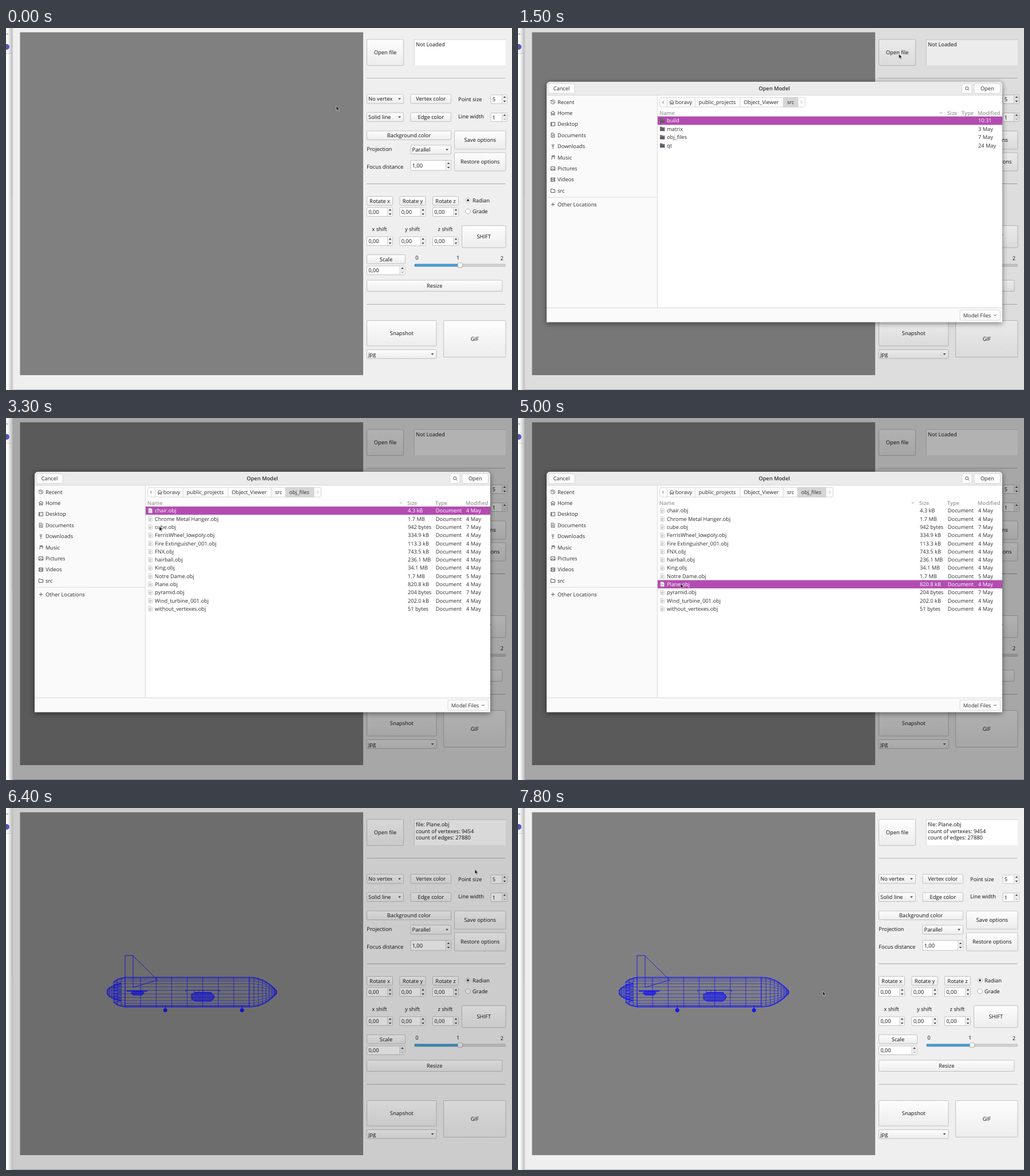
An HTML page that plays this animation: 884x633 px, repeating every 8000 ms.

```html
<!DOCTYPE html>
<html lang="en">
<head>
<meta charset="utf-8">
<title>Object viewer</title>
<style>
  html, body { margin: 0; width: 100%; height: 100%; overflow: hidden; background: #fff; }
  svg { display: block; width: 100%; height: 100%; }
  text { font: 9.35px "Open Sans", "Noto Sans", sans-serif; fill: #111; text-rendering: geometricPrecision; white-space: pre; }
  .dialog text { font-size: 9.25px; fill: #2c2c2c; }
  .dialog text.bold { font-weight: 600; }
  .dialog text.head { font-weight: 600; fill: #979d98; }
  .dialog text.head.hover { fill: #555a56; }
  .dialog .sel text { fill: #fff; }
  .row .bar { fill: none; }
  .sel .bar { fill: #b34cb1; }
  .icon { fill: none; stroke: #4a4a4a; stroke-width: .9; }
  .wire { fill: none; stroke: #1616f2; stroke-width: .75; }
</style>
</head>
<body>
<svg id="stage" viewBox="0 0 884 633" xmlns="http://www.w3.org/2000/svg">
  <defs>
    <linearGradient id="face" x2="0" y2="1"><stop stop-color="#fdfdfd"/><stop offset="1" stop-color="#ededed"/></linearGradient>
    <linearGradient id="edge"><stop stop-color="#777" stop-opacity="0"/><stop offset="1" stop-color="#777" stop-opacity=".5"/></linearGradient>
  </defs>
</svg>
<script>
const LOOP = 8000, STEP = 100;
const stage = document.getElementById("stage");
let parent = stage;

function el(tag, attrs, content) {
  const node = document.createElementNS("http://www.w3.org/2000/svg", tag);
  for (const k in attrs) node.setAttribute(k, attrs[k]);
  if (content !== undefined) node.textContent = content;
  parent.appendChild(node);
  return node;
}
function group(attrs, build) {
  const outer = parent;
  const node = parent = el("g", attrs);
  build(node);
  parent = outer;
  return node;
}
const box = (x, y, x2, y2, fill, stroke = "none", rx = 0) =>
  el("rect", { x, y, width: x2 - x, height: y2 - y, fill, stroke, rx, "stroke-width": .8 });
const path = (d, attrs) => el("path", { d, ...attrs });
const line = (x, y, x2, y2, stroke, w = 1) => path(`M${x} ${y}L${x2} ${y2}`, { stroke, "stroke-width": w });
// y is the middle of the line of text
const label = (s, x, y, cls = "", anchor = "start") =>
  el("text", { x, y: y + 3.3, class: cls, "text-anchor": anchor }, s);

/* ---------- main window ---------- */
const GREY = "#b4b4b4";

function button(s, x, y, x2, y2) {
  const face = box(x, y, x2, y2, "url(#face)", GREY, 1.5);
  label(s, (x + x2) / 2, (y + y2) / 2, "", "middle");
  return face;
}
function arrow(x, y, dir, fill = "#444") {
  path(`M${x - 2.5} ${y - 1.3 * dir}h5l-2.5 ${2.8 * dir}z`, { fill });
}
function combo(s, x, y, x2, y2) {
  box(x, y, x2, y2, "url(#face)", GREY, 1.5);
  label(s, x + 2.5, (y + y2) / 2);
  arrow(x2 - 7, (y + y2) / 2, 1);
}
function spin(s, x, y, x2, y2, lowered = "#444") {
  const mid = (y + y2) / 2, bx = x2 - 9;
  box(x, y, x2, y2, "#fff", GREY, 1.5);
  box(bx, y + .4, x2 - .4, y2 - .4, "#f4f4f4");
  line(bx, y, bx, y2, "#c4c4c4", .8);
  line(bx, mid, x2, mid, "#d4d4d4", .6);
  arrow(x2 - 4.5, mid - 3.8, -1);
  arrow(x2 - 4.5, mid + 3.8, 1, lowered);
  label(s, x + 2.7, mid + .2);
}
function rule(y) {
  line(630, y, 872.5, y, "#9c9c9c", 1);
  line(630, y + 1, 872.5, y + 1, "#fafafa", .8);
}
function radio(s, y, on) {
  el("circle", { cx: 807, cy: y, r: 4.2, fill: "#fff", stroke: "#a4a4a4", "stroke-width": .8 });
  if (on) el("circle", { cx: 807, cy: y, r: 2, fill: "#333" });
  label(s, 815, y);
}

// strip of the window behind
box(0, 0, 12, 633, "#fff");
box(0, 0, 12, 44, "#fafafa");
line(0, 44.5, 11, 44.5, "#d8d8d8");
line(0, 10.5, 4, 10.5, "#777", .9);
el("circle", { cx: 1, cy: 33, r: 5, fill: "#5059b5" });
box(3, 0, 11.5, 633, "url(#edge)");
line(11, 45, 11, 296, "#b0b0b0", .8);

let openFace, notes, info;
box(11.5, 0, 884, 633, "#efefef");
line(11.5, 632.5, 884, 632.5, "#b5b5b5");
line(11.8, 0, 11.8, 633, "#c6c6c6", .7);
box(24.5, 7.5, 624, 607, "#808080");

openFace = button("Open file", 630.5, 20, 694.5, 65.5);
box(713, 20, 873, 65, "#fff");
path("M713.3 65V20.3H873", { fill: "none", stroke: "#c0c0c0", "stroke-width": .7 });
notes = group({}, () => label("Not Loaded", 716, 29));
info = group({}, () => ["file: Plane.obj", "count of vertexes: 9454", "count of edges: 27880"]
  .forEach((s, i) => label(s, 716, 29 + 11.5 * i)));

[88, 272.5, 483.3].forEach(rule);

combo("No vertex", 630.5, 116, 694.5, 132);
button("Vertex color", 707, 116, 777.5, 132);
label("Point size", 790, 124.5);
spin("5", 847, 117, 875.5, 132);
combo("Solid line", 630.5, 148, 694.5, 163.5);
button("Edge color", 707, 148, 777.5, 163.5);
label("Line width", 790, 154.7);
spin("1", 847, 148.5, 875.5, 163.5, "#bbb");

button("Background color", 630.5, 180, 777.5, 195.5);
button("Save options", 783.5, 180, 873, 212);
button("Restore options", 783.5, 218, 873, 250);
label("Projection", 630.3, 212);
combo("Parallel", 707, 205, 777.5, 220.7);
label("Focus distance", 630.3, 242.7);
spin("1,00", 707, 231.5, 777.5, 249);

["x", "y", "z"].forEach((axis, i) => {
  const x = 630.5 + 57.5 * i;
  button("Rotate " + axis, x, 294.5, x + 45, 310);
  spin("0,00", x, 314, x + 45, 329.3);
  label(axis + " shift", x + 22, 352, "", "middle");
  spin("0,00", x, 365, x + 45, 380.3);
});
radio("Radian", 301.3, true);
radio("Grade", 320.5, false);
button("SHIFT", 796.5, 345.5, 873, 384);

button("Scale", 630.5, 396.5, 697.5, 412);
spin("0,00", 630.5, 416, 697, 431.3, "#bbb");
label("0", 718, 402, "", "middle");
label("1", 789.7, 402, "", "middle");
label("2", 866.3, 403, "", "middle");
box(714, 413, 872.5, 416.8, "#d4d4d4", "#b0b0b0", 1);
box(714, 413, 791, 416.8, "#45a0d6", "#3585b4", 1);
box(789.3, 410.8, 797.5, 418.8, "url(#face)", "#a0a0a0", 1.5);

button("Resize", 630.5, 441, 867, 460.5);
button("Snapshot", 630.5, 511.5, 752, 556);
combo("jpg", 630.5, 562.5, 752, 578);
button("GIF", 764.5, 511.5, 873, 575.5);

/* ---------- wireframe model ---------- */
const plane = group({ class: "wire" }, () => {
  const cy = 322, R = 26, sides = 13;
  const level = k => Math.cos(Math.PI * k / sides);
  const at = (x, y) => `${x.toFixed(1)} ${y.toFixed(1)}`;
  const lathe = (xs, radius, rings = true) => {
    for (let k = 0; k <= sides; k++)
      path("M" + xs.map(x => at(x, cy - radius(x) * level(k))).join("L"),
        k % sides ? { "stroke-width": .6 } : { "stroke-width": 1.2 });
    if (rings) xs.forEach(x => path(`M${at(x, cy - radius(x))}V${cy + radius(x)}`));
  };
  const span = (a, b, n, p = 1) => Array.from({ length: n + 1 }, (_, i) => a + (b - a) * (1 - (1 - i / n) ** p));

  lathe(span(208, 425, 8), () => R);
  lathe(span(425, 473, 9, 1.6), x => 2 + 24 * (1 - ((x - 425) / 48) ** 2.2));
  lathe(span(188, 208, 3), x => 17.5 + 8.5 * Math.sqrt((x - 188) / 20));
  lathe(span(176, 201, 6), x => 2 + 13.5 * Math.sqrt((x - 176) / 25), false);
  line(208, 346, 425, 346, "#1616f2", .8);

  // jagged seam at the tail
  let d = "M188 304";
  for (let i = 1; i <= 14; i++) d += `L${i % 2 ? 201 : 188} ${304 + i * 2.55}`;
  path(d);
  path("M181 315V328M185 311V333M189 309V335");

  // fin
  path("M208 297V258H221.5L265 301L222 313.5V258", { "stroke-width": .9 });

  // tailplane and its engine
  path("M211 319.7H248M211 320.7H247", { "stroke-width": 1 });
  path("M218 323.5L222 320.8H238L241.5 323L238 327.3H222Z", { fill: "#1616f2", "fill-opacity": .75 });

  // wing and its engine
  path("M313 318.6H374M314 318.6V322M329 318.6V323M337 318.6V323M345 318.6V322M373 318.6V322");
  path("M324 326L331 322.5H358L364 330L358 338H331L324 334Z", { fill: "#1616f2", "fill-opacity": .3, "stroke-width": 1.1 });
  for (let i = 0; i < 10; i++) path(`M${331 + i * 3} 322.5V338`);
  for (let i = 0; i < 6; i++) path(`M325 ${326 + i * 1.6}L331 ${323.5 + i * 2.7}H358L363.5 ${328 + i}`);

  // wheels
  [278.3, 412.3].forEach(x => {
    path(`M${x} 345V351`, { "stroke-width": 1.2 });
    el("circle", { cx: x, cy: 353.6, r: 3.2, fill: "#1616f2" });
  });
});

const dim = box(11.5, 0, 884, 633, "#000");

/* ---------- file dialog ---------- */
const ICONS = {
  Recent: "M-3.5 0a3.5 3.5 0 1 0 1-2.5M-3.6-3.5v2h2M0-2V0L2 1",
  Home: "M-4 0L0-3.5L4 0M-2.7-.8V3.5H-1V1H1V3.5H2.7V-.8",
  Desktop: "M-3.5-3H3.5V3H-3.5ZM-2.2-3V3",
  Documents: "M-2.8-3.6H1L2.8-1.8V3.6H-2.8ZM-1.4-.6H1.4M-1.4 1.2H1.4",
  Downloads: "M0-3.5V1M-1.8-.8L0 1L1.8-.8M-1.6 3.2H1.6M-1.8-3.5V-2M1.8-3.5V-2",
  Music: "M-1.6 2.4V-3H3V1.4M-3.2 2.6H-1.6M1.4 1.8H3M-1.6-1.6H3",
  Pictures: "M-3.6-3H3.6V3H-3.6ZM-3 2.4L-.8-.2L.8 1.6L1.8.6L3 2.4M1.4-1.4h.8",
  Videos: "M-3.4-3H3.4V3H-3.4ZM-1.9-3V3M1.9-3V3M-1.9 0H1.9",
  src: "M-3.6 3V-3H-.8L.2-1.8H3.6V3Z",
  "Other Locations": "M-3 0H3M0-3V3"
};
const icon = (d, x, y) => path(d, { class: "icon", transform: `translate(${x} ${y})` });
const chevron = (x, y, turn, stroke) =>
  path("M-2.2-1.1L0 1.1L2.2-1.1", { fill: "none", stroke, "stroke-width": 1, transform: `translate(${x} ${y}) rotate(${turn})` });
const LINE = "#cfcfcf";

function flat(s, x, y, x2, y2) {
  box(x, y, x2, y2, "#fcfcfc", LINE, 3);
  label(s, (x + x2) / 2, (y + y2) / 2, "", "middle");
}
function pathBar(crumbs, active, end) {
  box(247.5, 121.3, end + 12.5, 138.2, "#fbfbfb", LINE, 3);
  chevron(253.5, 129.8, 90, "#555");
  chevron(end + 6.3, 129.8, -90, "#aaa");
  box(active, 121.3, end, 138.2, "#d6d6d6", LINE);
  [260.5, 309.3, 388, 463.5].forEach(x => x < active && line(x, 121.3, x, 138.2, LINE, .8));
  icon(ICONS.Home, 268.7, 129.8);
  crumbs.forEach(([s, x]) => label(s, x, 129.8));
}
function heads(sizeX, typeX) {
  const name = label("Name", 247, 148.2, "head");
  chevron(sizeX - 11, 148.2, 0, "#979d98");
  label("Size", sizeX, 148.2, "head");
  label("Type", typeX, 148.2, "head");
  label("Modified", 803, 148.2, "head");
  return name;
}
function row(y, h, cells, drawIcon) {
  return group({ class: "row" }, () => {
    el("rect", { class: "bar", x: 244, y: y - h / 2, width: 602, height: h });
    drawIcon(y);
    cells.forEach(([s, x]) => label(s, x, y));
  });
}
function folderIcon(y) {
  path(`M248 ${y - 3.8}h3.4l1 1h4v6.6h-8.4z`, { fill: "#625a67" });
  line(248.3, y - 1.4, 256.2, y - 1.4, "#918997", .7);
}
function fileIcon(y) {
  path(`M249 ${y - 4}h4.4l2 2v6h-6.4z`, { fill: "#fbfbfb", stroke: "#b5bbb8", "stroke-width": .8 });
  path(`M250.3 ${y - .8}h3.6M250.3 ${y + .8}h3.6M250.3 ${y + 2.3}h2.4`, { stroke: "#8b9792", "stroke-width": .7 });
}

const crumbs = [["boravy", 274.8], ["public_projects", 315.8], ["Object_Viewer", 394.3], ["src", 470]];
const FOLDERS = [["build", "10:31"], ["matrix", "3 May"], ["obj_files", "7 May"], ["qt", "24 May"]];
const FILES = [
  ["chair", "4.3 kB", 4], ["Chrome Metal Hanger", "1.7 MB", 4], ["cube", "942 bytes", 7],
  ["FerrisWheel_lowpoly", "334.9 kB", 4], ["Fire Extinguisher_001", "113.3 kB", 4], ["FNX", "743.5 kB", 4],
  ["hairball", "236.1 MB", 4], ["King", "34.1 MB", 4], ["Notre Dame", "1.7 MB", 5], ["Plane", "820.8 kB", 4],
  ["pyramid", "204 bytes", 7], ["Wind_turbine_001", "202.0 kB", 4], ["without_vertexes", "51 bytes", 4]
];
const views = [];

const dialog = group({ class: "dialog" }, node => {
  node.style.filter = "drop-shadow(0 2px 5px rgba(0,0,0,.5))";
  node.style.transformOrigin = "448px 304px";
  path("M50 514.5V100a6 6 0 0 1 6-6H840a6 6 0 0 1 6 6V514.5Z", { fill: "#fafafa" });
  path("M50 117.5V100a6 6 0 0 1 6-6H840a6 6 0 0 1 6 6V117.5Z", { fill: "#ebebeb" });
  line(50, 117.6, 846, 117.6, "#d6d6d6");
  box(244, 118, 846, 489, "#fff");
  line(243.5, 118, 243.5, 489, "#d9d9d9");
  line(50, 489.3, 846, 489.3, "#d6d6d6");

  flat("Cancel", 53, 97, 99, 114.5);
  flat("Open", 797, 97, 842.5, 114.5);
  flat("", 775.5, 97, 793, 114.5);
  path("M786.3 107.3l2 2M786.8 105.3a2.6 2.6 0 1 1-5.2 0a2.6 2.6 0 1 1 5.2 0", { class: "icon" });
  label("Open Model", 447.8, 106, "bold", "middle");

  Object.keys(ICONS).forEach((s, i) => {
    const y = i < 9 ? 129.3 + 19.4 * i : 308.5;
    icon(ICONS[s], 61, y);
    label(s, 69, y);
  });
  line(50, 296, 243, 296, "#dcdcdc");

  box(772, 493, 842.5, 511, "#fcfcfc", LINE, 3);
  label("Model Files", 777.7, 502.2);
  chevron(833.5, 502.2, 0, "#444");

  views.push({}, {});
  views[0].node = group({}, () => {
    pathBar(crumbs, 463.5, 489);
    views[0].name = heads(750, 775);
    views[0].rows = FOLDERS.map(([s, when], i) =>
      row(162 + 14.5 * i, 14.8, [[s, 260], [when, 804]], folderIcon));
  });
  views[1].node = group({}, () => {
    pathBar([...crumbs, ["obj_files", 494.8]], 488.5, 538);
    views[1].name = heads(701, 750);
    views[1].rows = FILES.map(([s, size, day], i) =>
      row(162 + 14.3 * i, 14.4, [[s + ".obj", 260], [size, 702], ["Document", 750.8], [day + " May", 804]], fileIcon));
  });
});

const pointer = path("M0 0V8.2L2 6.4L3.3 9.4L4.7 8.8L3.4 5.9H5.8Z",
  { fill: "#1c1c1c", stroke: "#f4f4f4", "stroke-width": .6 });

/* ---------- timeline ---------- */
const EASE = {
  lin: p => p,
  in: p => p * p,
  out: p => 1 - (1 - p) ** 2,
  both: p => p * p * (3 - 2 * p)
};
// time, x, y, easing towards this point
const TRACK = [
  [0, 577, 136.3], [100, 577, 136.3], [1000, 665.3, 45.3, "both"], [1500, 665.3, 45.3],
  [1900, 480, 116.3, "in"], [2500, 268.3, 197.3, "out"], [2800, 268.3, 197.3], [3000, 267.8, 189.3],
  [3600, 267.8, 189.3], [3900, 278.5, 220.3, "both"], [4000, 279.5, 220.3], [4200, 280, 257.5],
  [4300, 280, 258.3], [4400, 280, 293], [4600, 280, 293], [4700, 283, 301], [4800, 284, 289.5],
  [5100, 284, 289.5], [6000, 810, 108.3, "both"], [6200, 819, 107.3], [6400, 819, 107.3],
  [6900, 619, 279.3, "in"], [7100, 545, 324], [7300, 505.5, 329], [7500, 531.5, 320.3, "out"],
  [7700, 531.5, 320.3], [7800, 532.3, 320.3], [LOOP, 532.3, 320.3]
];
const ramp = (t, from, length) => Math.min(1, Math.max(0, (t - from) / length));

function pointerAt(t) {
  const i = TRACK.findIndex(k => k[0] > t);
  const [t0, x0, y0] = TRACK[i - 1], [t1, x1, y1, ease = "lin"] = TRACK[i];
  const p = EASE[ease]((t - t0) / (t1 - t0));
  return [x0 + (x1 - x0) * p, y0 + (y1 - y0) * p];
}
const show = (node, on) => node.setAttribute("display", on ? "inline" : "none");

function render(t) {
  const [x, y] = pointerAt(t);
  pointer.setAttribute("transform", `translate(${x} ${y})`);

  openFace.setAttribute("fill", t >= 1100 && t < 1300 ? "#dcdcdc" : "url(#face)");
  dim.setAttribute("opacity", .3 * (ramp(t, 1375, 500) - ramp(t, 6275, 250)));

  const open = EASE.out(ramp(t, 1350, 100)) - EASE.out(ramp(t, 6275, 100));
  show(dialog, open > 0);
  dialog.style.transform = open < 1 ? `scaleY(${open})` : "none";

  const current = t < 3300 ? 0 : 1;
  const chosen = current ? (t < 5000 ? 0 : 9) : (t < 3000 ? 0 : 2);
  views.forEach((v, i) => show(v.node, i === current));
  const view = views[current];
  view.rows.forEach((r, i) => r.setAttribute("class", i === chosen ? "row sel" : "row"));
  const over = open === 1 && y > 141 && y < 154 && x > 244 && x < (current ? 698 : 747);
  view.name.setAttribute("class", over ? "head hover" : "head");

  const loaded = t >= 6400;
  show(plane, loaded);
  show(info, loaded);
  show(notes, !loaded);
}

const start = performance.now();
function tick() {
  const t = (performance.now() - start) % LOOP;
  render(Math.floor(t / STEP) * STEP);
  requestAnimationFrame(tick);
}
tick();
</script>
</body>
</html>
```
